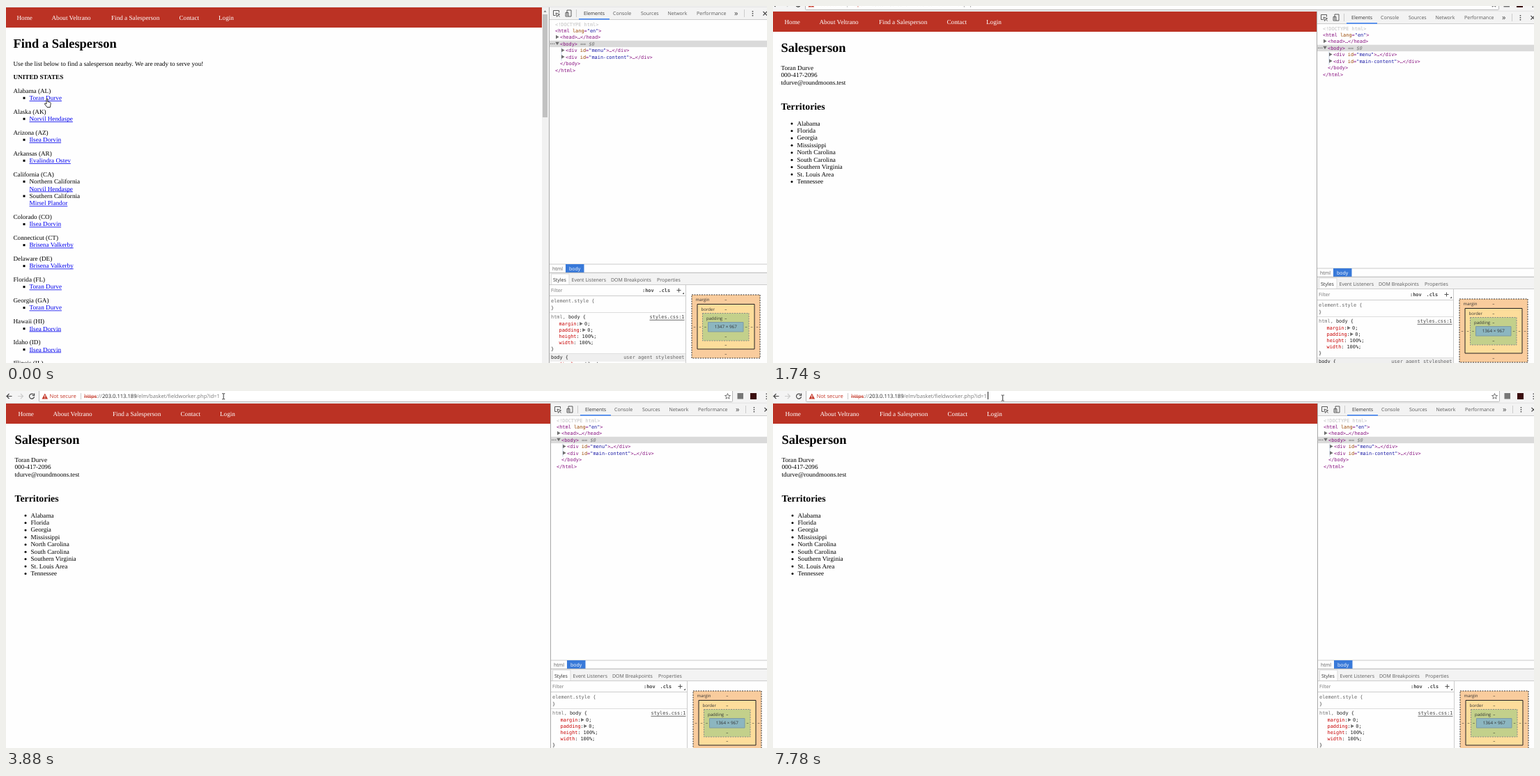
These frames come from a looping animation (1092x513 px, 8000 ms). An HTML page with a canvas:

```html
<!DOCTYPE html>
<html lang="en">
<head>
<meta charset="utf-8">
<style>
html, body { margin: 0; width: 100%; height: 100%; overflow: hidden; background: #fefefe; }
canvas { display: block; }
</style>
</head>
<body>
<canvas id="stage" width="1092" height="513"></canvas>
<script>
const g = document.getElementById('stage').getContext('2d');
g.textRendering = 'geometricPrecision';

const LOOP = 8000, NAV = 500;
const SERIF = '"Liberation Serif", serif', SANS = '"Open Sans", sans-serif', MONO = '"DejaVu Sans Mono", monospace';
const GREY = '#5a5a5a', RED = '#c5392a', LINK = '#0000ee', LINE = '#ccc';

// y is the middle of the capitals; returns the width
function text(s, x, y, color, size, family, style = '', align = 'left') {
  g.font = `${style} ${size}px ${family}`;
  g.textAlign = align;
  g.fillStyle = color;
  g.fillText(s, x, y + size * (family === SERIF ? .33 : .36));
  return g.measureText(s).width;
}
const serif = (s, x, y, color = '#000', size = 9.18, style = '') => text(s, x, y, color, size, SERIF, style);
const sans = (s, x, y, color = GREY, size = 7, align) => text(s, x, y, color, size, SANS, '', align);
const mono = (s, x, y, color = '#222', style, align) => text(s, x, y, color, 6.92, MONO, style, align);

function rect(x, y, w, h, color) { g.fillStyle = color; g.fillRect(x, y, w, h); }
function shape(d, x, y, fill, stroke, width = 1) {
  const p = new Path2D(d);
  g.save();
  g.translate(x, y);
  if (fill) { g.fillStyle = fill; g.fill(p); }
  if (stroke) { g.strokeStyle = stroke; g.lineWidth = width; g.stroke(p); }
  g.restore();
}
const right = (x, y) => shape('M0-2.7L4.6 0 0 2.7z', x, y, '#6e6e6e');

function link(s, x, y) {
  const w = serif(s, x, y, LINK);
  rect(x, y + 4, w, .8, LINK);
}

// Web page
const DURVE = 'Toran Durve', HENDASPE = 'Norvil Hendaspe', DORVIN = 'Ilsea Dorvin', VALKERBY = 'Brisena Valkerby';
const LIST = [
  ['Alabama (AL)', DURVE], ['Alaska (AK)', HENDASPE], ['Arizona (AZ)', DORVIN],
  ['Arkansas (AR)', 'Evalindra Ostev'],
  ['California (CA)', HENDASPE, 'Mirsel Plandor'],
  ['Colorado (CO)', DORVIN], ['Connecticut (CT)', VALKERBY], ['Delaware (DE)', VALKERBY],
  ['Florida (FL)', DURVE], ['Georgia (GA)', DURVE], ['Hawaii (HI)', DORVIN],
  ['Idaho (ID)', DORVIN], ['Illinois (IL)']
];
const AREAS = ['Alabama', 'Florida', 'Georgia', 'Mississippi', 'North Carolina', 'South Carolina',
  'Southern Virginia', 'St. Louis Area', 'Tennessee'];
const MENU = [['Home', 15.5], ['About Veltrano', 65.5], ['Find a Salesperson', 151], ['Contact', 248.5], ['Login', 305]];
const ROW = 10.42;

function listPage() {
  serif('Find a Salesperson', 10.5, 54.3, '#000', 18.4, 'bold');
  serif('Use the list below to find a salesperson nearby. We are ready to serve you!', 10.5, 82.5);
  serif('UNITED STATES', 10.5, 101.7, '#000', 9.18, 'bold');
  let y = 121.6;
  for (const [state, ...people] of LIST) {
    serif(state, 10.5, y);
    people.forEach((name, i) => {
      y += ROW;
      rect(24.5, y - 1.3, 3, 3, '#000');
      if (people.length > 1) {
        serif(['Northern California', 'Southern California'][i], 33.5, y);
        y += ROW;
      }
      link(name, 33.5, y);
    });
    y += 19.6;
  }
  rect(769, 2, 10, 520, '#f1f1f1');
  rect(770, 12, 7, 148, '#c1c1c1');
  shape('M-2 1.2L0-1.2 2 1.2z', 773.5, 7.5, '#777');
}

function personPage() {
  serif('Salesperson', 10.5, 54.3, '#000', 18.4, 'bold');
  [DURVE, '000-417-2096', 'tdurve@roundmoons.test'].forEach((s, i) => serif(s, 10.5, 82.7 + i * ROW));
  serif('Territories', 10.5, 138, '#000', 13.8, 'bold');
  AREAS.forEach((s, i) => {
    const y = 162.6 + i * ROW;
    shape('M-1.5 0a1.5 1.5 0 1 0 3 0a1.5 1.5 0 1 0-3 0', 26, y + .5, '#000');
    serif(s, 33.5, y);
  });
}

function page(listed) {
  rect(-5, 2, listed ? 774 : 784, 29, '#bb3224');
  for (const [s, x] of MENU) serif(s, x, 17, '#fff');
  if (listed) listPage(); else personPage();
}

// Developer tools
function markup(s, x, y) {
  s.split(/(\w+(?==)|"[^"]+")/).forEach((part, i) => {
    x += mono(part, x, y, i % 2 ? (part[0] === '"' ? '#1a1aa6' : '#994500') : '#881280');
  });
  return x;
}

function elementsPanel() {
  rect(780, 1.5, 320, 18, '#f3f3f3');
  rect(780, 19, 320, 1, LINE);
  shape('M3 7H0V0H8V3M3.5 3.5L9 5.5 6.8 6.5 9 9M3.5 3.5L5 9 6.8 6.5', 785.5, 6.5, null, GREY, 1);
  shape('M2 8V0H8V9H4M0 3.5H4V9H0z', 803, 6, null, GREY, 1);
  rect(818, 5, 1, 11, LINE);
  rect(1059, 5, 1, 11, LINE);
  [['Elements', 829], ['Console', 871], ['Sources', 911], ['Network', 949.5], ['Performance', 991]]
    .forEach(([s, x], i) => sans(s, x, 10.8, i ? GREY : '#333'));
  rect(822, 18, 44, 1.6, '#4285f4');
  sans('»', 1045, 10, '#444', 11);
  for (const y of [7, 10, 13]) rect(1070.7, y, 1.5, 1.5, '#444');
  shape('M0 0L5.5 5.5M5.5 0L0 5.5', 1086.5, 8, null, '#444', 1.1);

  rect(780, 49.7, 320, 9.4, '#dadada');
  mono('<!DOCTYPE html>', 788, 26.3, '#c0c0c0');
  markup('<html lang="en">', 788, 35.5);
  markup('<head>…</head>', 795, 45);
  right(789, 44.5);
  const end = markup('<body>', 795, 54.3);
  mono('== $0', end + 4, 54.3, '#777', 'italic');
  shape('M-2.7-2.3H2.7L0 2.3z', 791, 54, '#6e6e6e');
  for (const x of [781, 783.5, 786]) rect(x, 53.7, 1.3, 1.3, '#777');
  rect(796.5, 59.5, 1, 19, '#c9d8ec');
  ['menu', 'main-content'].forEach((id, i) => {
    markup(`<div id="${id}">…</div>`, 803, 64 + i * 9.4);
    right(797, 63.6 + i * 9.4);
  });
  markup('</body>', 795, 83);
  markup('</html>', 788, 92.3);

  rect(780, 370.5, 320, 1, LINE);
  rect(803, 371, 26.5, 12, '#3879d9');
  sans('html', 784, 377);
  sans('body', 808, 377, '#fff');
}

function stylesPanel() {
  rect(780, 382.8, 320, 1, '#b5b5b5');
  rect(780, 384, 320, 16, '#f3f3f3');
  rect(782.5, 385, 25.5, 15, '#fefefe');
  shape('M0 15V0H25.5V15', 782.5, 385, null, '#ddd', 1);
  [['Styles', 785], ['Event Listeners', 811.5], ['DOM Breakpoints', 868], ['Properties', 934]]
    .forEach(([s, x], i) => sans(s, x, 393, i ? GREY : '#333'));
  rect(780, 400, 320, 1, LINE);
  rect(780, 416, 195, 1, LINE);
  rect(975, 400, 1, 130, LINE);
  sans('Filter', 782, 408.8, '#777');
  mono(':hov', 913, 408.5, '#444', 'bold');
  mono('.cls', 936.5, 408.5, '#444', 'bold');
  shape('M0 3H6M3 0V6', 962.5, 405.5, null, '#555', 1);
  shape('M2.5 0V2.5H0z', 970.5, 411.5, '#555');

  mono('element.style {', 782, 423.2, '#666');
  mono('}', 782, 434, '#444');
  rect(780, 440, 195, 1, '#ddd');
  const w = mono('html, ', 782, 447, '#777');
  mono('body {', 782 + w, 447);
  mono('styles.css:1', 973.5, 447, '#444', '', 'right');
  rect(923.5, 450.8, 50, .8, '#444');
  [['margin', '0'], ['padding', '0'], ['height', '100%'], ['width', '100%']].forEach(([name, value], i) => {
    const y = 456.6 + i * 9;
    let x = 793.5 + mono(name, 793.5, y, '#c80000');
    x += mono(':', x, y);
    if (i < 2) { right(x + .5, y); x += 3.5; }
    mono(value + ';', x + 4, y);
  });
  mono('}', 782, 492.6);
  rect(780, 499, 195, 12, '#efefef');
  rect(780, 499, 195, .8, '#ddd');
  mono('body {', 782, 505);
  mono('user agent stylesheet', 973.5, 505, '#666', '', 'right');
  mono('display', 793.5, 514.3, '#c80000');
  mono(': block;', 822.6, 514.3);
}

function boxModel(size) {
  const boxes = [
    ['margin', 984, 415, 98, 91, '#f9cc9d', '#333', [2, 1.5]],
    ['border', 992, 428.5, 82, 64.5, '#fddd9b', '#222', []],
    ['padding', 999.5, 441.5, 66.5, 39.5, '#c3d08b', '#888', [2, 1.5]],
    ['', 1007.5, 454.5, 50.5, 13.5, '#8cb6c0', '#7d9aa5', []]
  ];
  for (const [name, x, y, w, h, fill, stroke, dash] of boxes) {
    g.setLineDash(dash);
    shape(`M0 0H${w}V${h}H0z`, x, y, fill, stroke, 1);
    g.setLineDash([]);
    if (!name) continue;
    sans(name, x + 5.5, y + 7, '#333', 6.1);
    for (const yy of [y + 7, y + h - 6]) sans('–', 1032.7, yy, '#222', 6.2, 'center');
    for (const xx of [x + 4, x + w - 4]) sans('–', xx, 461.2, '#222', 6.2, 'center');
  }
  sans(size, 1032.7, 461.2, '#333', 6.3, 'center');
}

// Address bar
function toolbar(t) {
  rect(-5, -10, 1110, 27.5, '#f4f4f4');
  rect(-5, 16.8, 1110, .8, '#ddd');
  shape('M7.5 0H0M3.5-3.5L0 0 3.5 3.5', 1, 7.5, null, '#444', 1.2);
  shape('M0 0H7.5M4-3.5L7.5 0 4 3.5', 17, 7.5, null, '#ccc', 1.2);
  shape('M2.6-2.3A3.5 3.5 0 1 0 3.5.6M3.6-4V-1H.6', 37, 7.5, null, '#444', 1.2);
  shape('M0-8H995V7q0 1-1 1H1q-1 0-1-1z', 47.5, 7.5, '#fff', '#b9b9b9', 1);
  shape('M0 8L4.3 0 8.6 8z', 51.5, 3.5, RED);
  rect(55.3, 6, 1, 3, '#fff');
  rect(55.3, 9.6, 1, 1, '#fff');
  sans('Not secure', 62.5, 7.6, RED, 7.6);
  rect(107, 3, 1, 9, LINE);

  const picked = t >= 5150 && t < 5650;
  if (picked) rect(112, 1.5, 196, 11, '#3390ff');
  const ink = c => picked ? '#fff' : c;
  const w = sans('https', 112, 7.6, ink(RED), 7.6);
  if (!picked) rect(112, 8, w, .8, RED);
  sans('://', 112 + w, 7.6, ink('#777'), 7.6);
  sans('203.0.113.189', 138, 7.6, ink('#222'), 7.6);
  sans('/elm/basket/fieldworker.php?id=1', 187.3, 7.6, ink('#777'), 7.6);
  const caret = t >= 4980 && t < 5150 || t >= 5650 && t < 6260 || t >= 6750 && t < 7280 || t >= 7780;
  if (caret) rect(308, 1, 1, 11, '#222');

  shape('M0-4L1.1-1.2 4-1 1.8.8 2.5 3.7 0 2.1-2.5 3.7-1.8.8-4-1-1.1-1.2z', 1035.5, 7.5, null, '#555', .8);
  rect(1049.5, 3, 8.5, 8.5, '#777');
  rect(1068, 3, 9, 9, '#3a0c0e');
  for (const y of [3.5, 7, 10.5]) rect(1090.5, y, 1.5, 1.5, '#555');
}

// Times, then x and y
const PAN = [[0, 0, 0], [1580, .3, 2], [1660, .7, 4], [1740, 1, 6], [1870, 1, 8], [2010, 1, 9], [2140, 1.5, 13], [2270, 2, 16]];
const LEAVE = [[440, 61, 133], [700, 85, 75], [980, 130, -14]];
const POINT = [[2760, 253, 15], [2840, 253, 15], [2960, 232, 4], [3110, 278, 8], [3260, 278, 8], [3450, 264, 15],
  [3800, 325, 6], [4080, 280, 12], [4300, 274, 16], [4470, 300, 27], [4630, 337, 16], [4750, 330.5, 10],
  [5650, 330.5, 10], [5700, 329.7, 10]];

function along(path, t) {
  const i = path.findIndex(p => p[0] > t);
  if (i < 0) return path[path.length - 1].slice(1);
  const a = path[i - 1], b = path[i], k = (t - a[0]) / (b[0] - a[0]);
  return [a[1] + (b[1] - a[1]) * k, a[2] + (b[2] - a[2]) * k];
}

const HAND = 'M3 1.2q1-1.2 1.8 0V5l3.6 1q1 .4.8 1.8L8.4 13H4L.6 8.6q-.4-1.4 1-1.2L3 8.4z';
const ARROW = 'M0 0V9.3L2.2 7.3 3.8 10.7 5.2 10 3.7 6.8H6.6z';
const BEAM = 'M-2-4H-.6L0-3.5.6-4H2M0-3.5V3.5M-2 4H-.6L0 3.5.6 4H2';

function pointer(t) {
  if (t < 440) return shape(HAND, t < 210 ? 55 : 58, 132.5, '#fff', '#000', .8);
  if (t < 980) return shape(t < NAV ? HAND : ARROW, ...along(LEAVE, t), '#fff', '#000', .8);
  if (t < 2760) return;
  const [x, y] = along(POINT, t);
  if (y > 14) shape(ARROW, x, y, '#fff', '#000', .8);
  else shape(BEAM, x, y, null, '#222', .9);
}

function draw(now) {
  const t = now % LOOP, listed = t < NAV;
  const [, dx, dy] = PAN.filter(p => p[0] <= t).pop();
  rect(0, 0, 1092, 513, '#fefefe');
  g.save();
  g.translate(dx, dy);
  page(listed);
  rect(779, 1.5, 1, 520, '#a8a8a8');
  elementsPanel();
  stylesPanel();
  boxModel(listed ? '1347 × 967' : '1364 × 967');
  g.translate(-2, -16);
  toolbar(t);
  g.restore();
  pointer(t);
  requestAnimationFrame(tick);
}

let start;
function tick(now) {
  start ??= now;
  draw(now - start);
}
requestAnimationFrame(tick);
</script>
</body>
</html>
```
